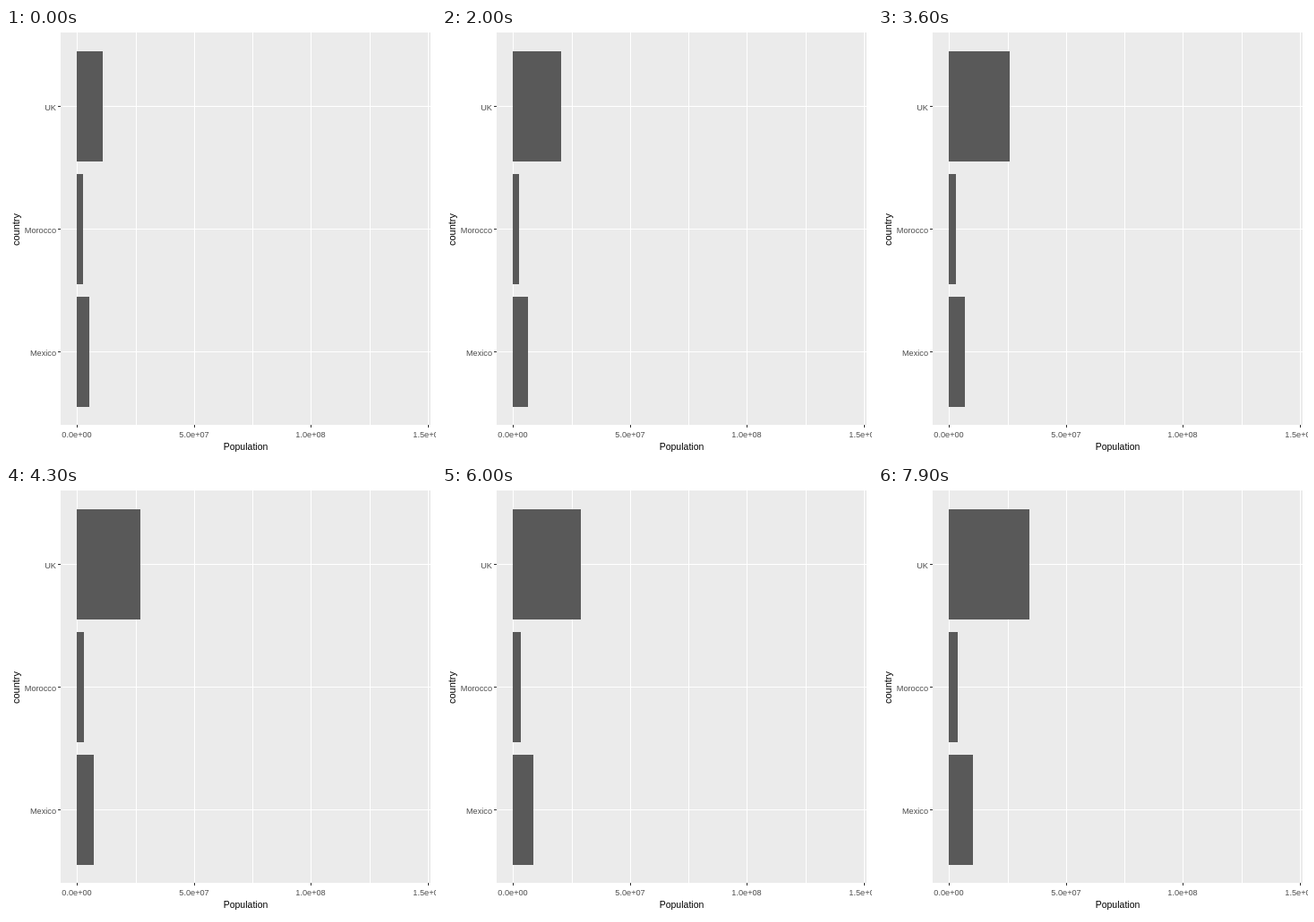
An HTML page with a canvas that plays this animation: 480 by 480 pixels, repeating every 8 s.

```html
<!DOCTYPE html>
<html lang="en">
<head>
<meta charset="utf-8">
<title>Population by country</title>
<style>
  html, body { margin: 0; width: 100%; height: 100%; overflow: hidden; background: #fff; }
  canvas { display: block; width: 480px; height: 480px; }
</style>
</head>
<body>
<canvas id="stage" width="480" height="480"></canvas>
<script>
const ctx = document.getElementById('stage').getContext('2d');
const STEP = 100, LOOP = 8000;
const PANEL = { x: 61, y: 5, w: 413, h: 438 };
const ZERO = 79, ROW = 137, BAR = 123;

// keys: [step, bar length], joined by straight lines
const bars = [
  { name: 'UK', keys: [[0, 28.6], [4, 29.3], [9, 31.4], [12, 36.2], [18, 50], [20, 54], [24, 58.7],
    [36, 67.9], [43, 70.8], [50, 71.55], [60, 75.85], [70, 82.15], [79, 90.07]] },
  { name: 'Morocco', keys: [[0, 7], [22, 7.5], [59, 8.5], [79, 9.95]] },
  { name: 'Mexico', keys: [[0, 14], [4, 14.5], [17, 16.55], [34, 17.55], [50, 20.6],
    [62, 23.55], [71, 24.6], [79, 27.05]] }
];

function lengthAt(keys, step) {
  const next = Math.max(1, keys.findIndex(key => key[0] >= step));
  const [t0, a] = keys[next - 1], [t1, b] = keys[next];
  return Math.round(a + (b - a) * (step - t0) / (t1 - t0));
}

function rect(color, x, y, w, h) {
  ctx.fillStyle = color;
  ctx.fillRect(x, y, w, h);
}

function text(str, x, y, size, color, align) {
  ctx.font = `${size}px "Liberation Sans", Arial, sans-serif`;
  ctx.fillStyle = color;
  ctx.textAlign = align;
  ctx.fillText(str, x, y);
}

function draw(step) {
  rect('#fff', 0, 0, 480, 480);
  rect('#ebebeb', PANEL.x, PANEL.y, PANEL.w, PANEL.h);

  // A grid line every 25 million, labelled every 50 million
  for (let i = 0; i < 7; i++) {
    const x = Math.round(79.3 + 65.25 * i);
    rect('#fff', x, PANEL.y, 1, PANEL.h);
    if (i % 2) continue;
    rect('#333', x, PANEL.y + PANEL.h, 1, 3);
    text((i * 25e6).toExponential(1).replace('+', '+0'), x, 457, 9.2, '#4d4d4d', 'center');
  }

  bars.forEach(({ name, keys }, i) => {
    const y = 87 + ROW * i;
    rect('#fff', PANEL.x, y, PANEL.w, 1);
    rect('#333', PANEL.x - 3, y, 3, 1);
    text(name, 56, y + 5, 9.2, '#4d4d4d', 'right');
    rect('#595959', ZERO, y - 61, lengthAt(keys, step), BAR);
  });

  text('Population', 267.5, 471, 10.5, '#000', 'center');
  ctx.save();
  ctx.translate(15, 225);
  ctx.rotate(-Math.PI / 2);
  text('country', 0, 0, 11, '#000', 'center');
  ctx.restore();
}

function frame() {
  draw(Math.floor(performance.now() % LOOP / STEP));
  requestAnimationFrame(frame);
}
frame();
</script>
</body>
</html>
```
